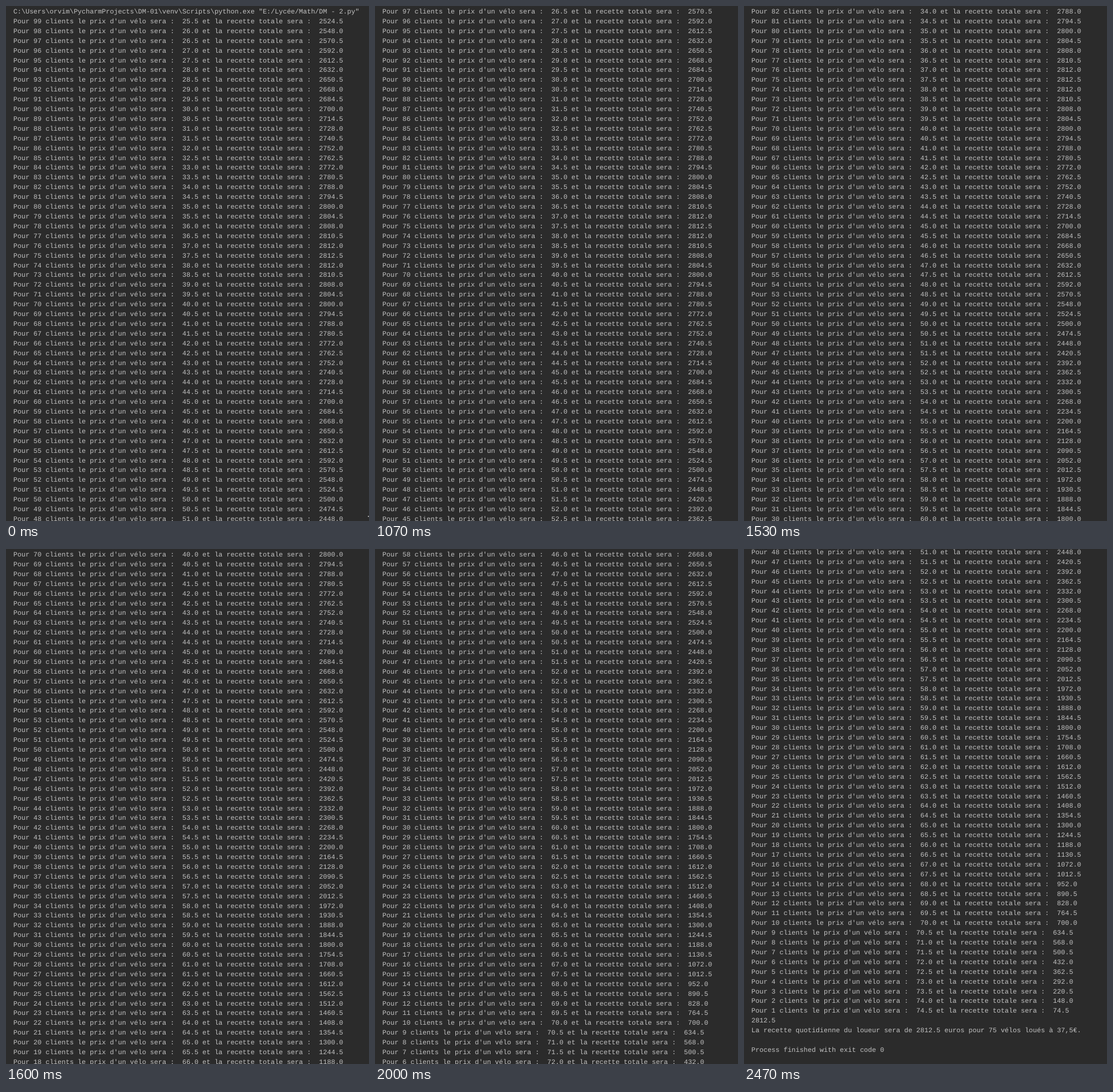
Animation of 628x892 px, one loop 4.27 s. Source, as an HTML page:

```html
<!DOCTYPE html>
<html lang="fr">
<head>
<meta charset="utf-8">
<title>Console</title>
<style>
  html, body {
    margin: 0;
    width: 100%;
    height: 100%;
    overflow: hidden;
    background: #2b2b2b;
  }
  svg {
    display: block;
    width: 628px;
    height: 892px;
  }
  text {
    fill: #c2c2c2;
    font: 11.6px "Liberation Mono", monospace;
    text-rendering: geometricPrecision;
    white-space: pre;
  }
</style>
</head>
<body>
<svg id="console" viewBox="0 0 628 892">
  <rect id="pointer" x="626" y="883" width="2" height="2" fill="#bbb"/>
</svg>
<script>
const LOOP = 4270;
const ROWS = 54;
const ROW_HEIGHT = 16.904;
const BASELINE = 13;
const LEFT = 12.8;

// Scroll steps: start time in ms, first visible line, extra shift in px
const steps = [
  [0, 0, 0],
  [1070, 3, 0], [1130, 6, 0], [1200, 12, 0], [1270, 15, 0],
  [1530, 18, 0], [1600, 30, 0], [1670, 39, 0],
  [2000, 42, 0], [2070, 51, 0],
  [2470, 51, 21]
];

function revenueLine(clients) {
  const price = 75 - clients / 2;
  return `Pour ${clients} clients le prix d'un vélo sera :  ${price.toFixed(1)}` +
    ` et la recette totale sera :  ${(clients * price).toFixed(1)}`;
}

const lines = [
  String.raw`C:\Users\orvim\PycharmProjects\DM-01\venv\Scripts\python.exe "E:/Lycée/Math/DM - 2.py"`,
  ...Array.from({ length: 99 }, (_, i) => revenueLine(99 - i)),
  "2812.5",
  "La recette quotidienne du loueur sera de 2812.5 euros pour 75 vélos loués à 37,5€.",
  "",
  "Process finished with exit code 0"
];

const output = document.getElementById("console");
const pointer = document.getElementById("pointer");
const rows = Array.from({ length: ROWS }, () => {
  const row = document.createElementNS("http://www.w3.org/2000/svg", "text");
  row.setAttribute("x", LEFT);
  return output.appendChild(row);
});

const start = performance.now();
let shown = null;

function render(time) {
  const step = steps.findLast(([at]) => at <= time);
  if (step !== shown) {
    const [, first, shift] = step;
    rows.forEach((row, i) => {
      row.textContent = lines[first + i] ?? "";
      row.setAttribute("y", Math.round(BASELINE + i * ROW_HEIGHT - shift));
    });
    shown = step;
  }
  pointer.style.opacity = time < 130 ? 0.8 : time < 200 ? 0.4 : 0;
}

function tick() {
  render((performance.now() - start) % LOOP);
  requestAnimationFrame(tick);
}
tick();
</script>
</body>
</html>
```
